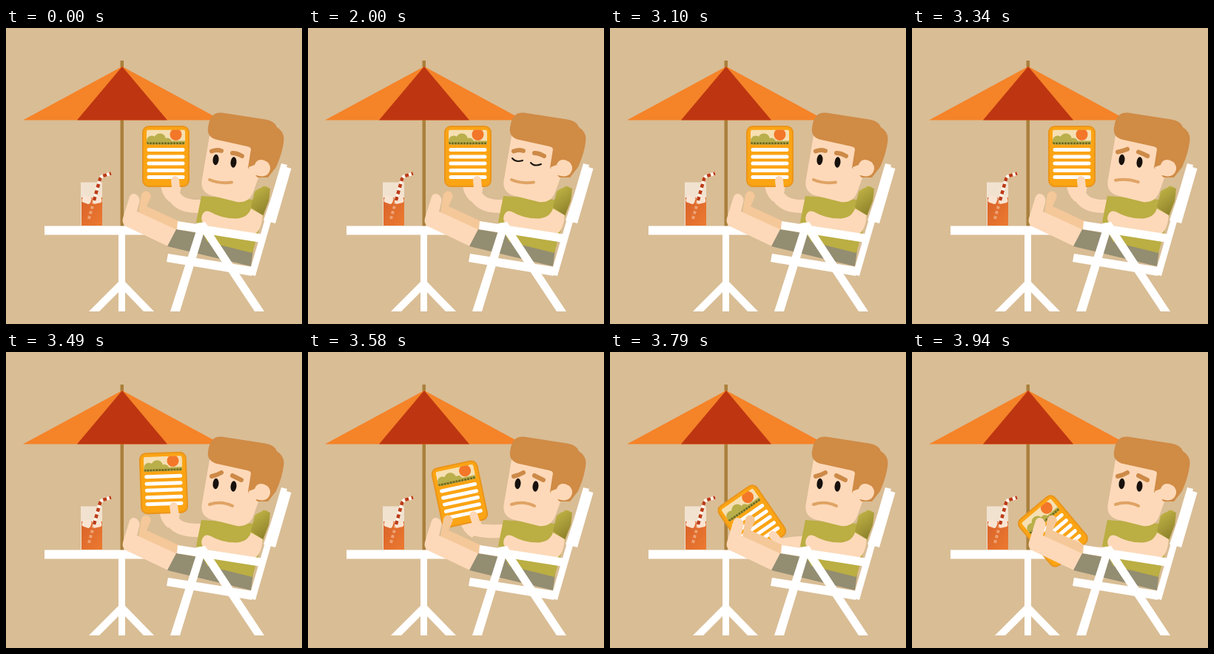
Animation of 400 by 400 pixels, one loop 4940 ms. Source, as an HTML page:

```html
<!DOCTYPE html>
<html lang="en">
<head>
<meta charset="utf-8">
<title>Deck chair</title>
<style>
  html, body { margin: 0; width: 100%; height: 100%; overflow: hidden; background: #d9bd95; }
  svg { display: block; width: 100%; height: 100%; }
  .skin { fill: #fdd9b9; }
  .white { fill: #fff; }
  .brow, .mouth { fill: none; stroke-linecap: round; }
  .brow { stroke: #cd8a48; stroke-width: 6; }
  .mouth { stroke: #dfa364; stroke-width: 4; }
  .lid { fill: none; stroke: #1a120c; stroke-width: 2; stroke-linecap: round; }
</style>
</head>
<body>
<svg viewBox="0 0 400 400">
  <defs>
    <linearGradient id="shade" x1="0" y1="0" x2="0.5" y2="1">
      <stop offset="0.2" stop-color="#bbae43"/>
      <stop offset="1" stop-color="#8f832c"/>
    </linearGradient>
    <linearGradient id="tea" x1="0" y1="0" x2="1" y2="1">
      <stop offset="0" stop-color="#d9622a"/>
      <stop offset="1" stop-color="#ec7a30"/>
    </linearGradient>
    <clipPath id="photo"><rect x="-26" y="-36" width="52" height="20" rx="3"/></clipPath>
  </defs>
  <rect width="400" height="400" fill="#d9bd95"/>

  <g id="parasol">
    <rect x="154.5" y="44" width="4.5" height="224" fill="#aa803c"/>
    <path d="M157 52L23 124.500H291Z" fill="#f58328"/>
    <path d="M157 52L96 124.500H218Z" fill="#bd3611"/>
  </g>

  <g id="table" class="white">
    <path d="M52 267.500H215V279.500H161V343L200 383H186L161 357V383H152V357L126 383H112L152 343V279.500H52Z"/>
  </g>

  <g id="drink" fill="none">
    <path d="M101 208.500H130V267H101Z" fill="#f1e2cf"/>
    <path d="M102 229H130V267H102Z" fill="url(#tea)"/>
    <path d="M112 258L119 233" stroke="#eda274" stroke-width="4" stroke-dasharray="4 3"/>
    <g fill="#f9e4d2">
      <rect x="103" y="227" width="12" height="10" rx="3" transform="rotate(18 109 232)"/>
      <rect x="117" y="227" width="12" height="10" rx="3" transform="rotate(-14 123 232)"/>
    </g>
    <g stroke-width="4.500">
      <path d="M119 233L127 204Q128 201 131 200L142 196.500" stroke="#fff4e8"/>
      <path d="M119 233L127 204Q128 201 131 200L142 196.500" stroke="#bb3b17" stroke-dasharray="5 4"/>
    </g>
  </g>

  <path id="arm" fill="none" stroke="#fdd9b9" stroke-width="18" stroke-linecap="round"/>
  <g id="tablet">
    <path class="skin" d="M-7 36Q-7 51 4 61L18 53 22 36Z"/>
    <rect x="-31" y="-40.500" width="62" height="81" rx="8" fill="#fba414" stroke="#ea951b" stroke-width="2"/>
    <g clip-path="url(#photo)">
      <rect x="-26" y="-36" width="52" height="20" fill="#f6dfb2"/>
      <g fill="#b9af4b">
        <circle cx="-19" cy="-21" r="7"/>
        <circle cx="-8" cy="-23" r="8"/>
        <circle cx="2" cy="-19" r="6"/>
        <rect x="-26" y="-21" width="52" height="5"/>
      </g>
      <circle cx="13.500" cy="-29.500" r="8" fill="#f37729"/>
      <path d="M-26 -17.500H26" stroke="#6f6a20" stroke-width="3" stroke-dasharray="3 1"/>
    </g>
    <path d="M-23 -9H23M-23 .5H23M-23 9.500H23M-23 19H23M-23 28H23" stroke="#fff" stroke-width="5" stroke-linecap="round"/>
    <path d="M12.500 32L14 47" stroke="#fdd9b9" stroke-width="11" stroke-linecap="round"/>
  </g>

  <g id="legs">
    <path d="M183 225Q187 218 193 222Q198 226 194 232L190 241L242 265 232 282 178 256Z" fill="#f5c899"/>
    <path class="skin" d="M167 228Q170 222 176 225Q182 229 180 236L177 248L236 275 221 296 162 268Q156 264 158 257Z"/>
    <path d="M230 272L275 280 334 300 331 322 218 295Z" fill="#938d72"/>
  </g>

  <g id="shirt">
    <path d="M264 227L335 232 347 214Q358 212 356 228L345 262 333 304 272 289 257 262Z" fill="#bbae43"/>
    <path d="M336 221Q346 212 357 217L355 234 347 254 331 242Z" fill="url(#shade)"/>
  </g>

  <g id="head">
    <path class="skin" d="M276 140L340 152 342 200 334 222Q328 237 312 235L278 226.500Q263 222 264.500 207Z"/>
    <path d="M283 150.500Q270 146 273.500 132Q276 113 292 114.500L350 123.500Q364 126 366 134Q376 140 375.500 151Q374 168 365 188L354 202H340L327 189 331 164Q331 161 326 160Z" fill="#d08b45"/>
    <path class="skin" d="M336 185Q339 176 348 178.500Q358 182 357 191Q354 204 338 199L330 203 328 188Z"/>
    <path id="browL" class="brow"/>
    <path id="browR" class="brow"/>
    <path id="mouth" class="mouth"/>
    <g id="open" fill="#17110d">
      <ellipse cx="283.500" cy="178" rx="4" ry="7.200" transform="rotate(5 283.500 178)"/>
      <ellipse cx="307.500" cy="181.500" rx="4" ry="7.200" transform="rotate(5 307.500 181.500)"/>
    </g>
    <g id="shut" class="lid">
      <path d="M276 176Q281 182 290 179"/>
      <path d="M301 182Q306 188 315 184"/>
    </g>
  </g>

  <path class="skin" d="M265 253Q268 245 276 248.500Q292 258 312 257.500Q327 256 331 244L347 253Q345 274 336 278L270 267Q262 261 265 253Z"/>

  <g id="chair" class="white">
    <path d="M372 183L380 185 337 335 328 333Z"/>
    <path d="M373 186L385.500 190 364 264 348 260Z"/>
    <path d="M219 305L334 323 332 335 217 316Z"/>
    <path d="M259 268L270 268 235 383H222Z"/>
    <path d="M257 264L269 262 349 383H336Z"/>
    <path d="M232 261L348 279 345 290 231 272Z"/>
  </g>
</svg>
<script>
const LOOP = 4940, BLINK = [2000, 2100];
const FROWN = [3100, 3450];
const STEP = 30;

// Lowering the tablet: time, x, y, angle, elbow x, elbow y
const drop = [
  [3400, 216, 173.5, 0, 262, 241],
  [3490, 213, 177, -2, 262, 241],
  [3580, 205, 192, -12, 262, 242],
  [3700, 194.5, 214.5, -28, 262, 247],
  [3940, 190.5, 242, -40, 268, 272]
];
// Points of each face line, calm and worried
const face = {
  browL: [[278, 166.5, 285, 164, 291, 166], [278, 168, 285, 166.5, 291, 163]],
  browR: [[306, 169, 312, 169, 319, 173], [306, 167, 311, 169.5, 318, 173]],
  mouth: [[275, 205, 289, 211, 305, 208.5], [275, 206, 291, 200.5, 306, 208]]
};

const $ = id => document.getElementById(id);
const clamp = v => Math.min(1, Math.max(0, v));
const ease = p => p * p * (3 - 2 * p);

function slope(i, c) {
  const a = drop[i - 1], b = drop[i + 1];
  return a && b ? (b[c] - a[c]) / (b[0] - a[0]) : 0;
}

// Smooth curve through the table, at rest at both ends
function track(t, c) {
  const last = drop.length - 1;
  if (t <= drop[0][0]) return drop[0][c];
  if (t >= drop[last][0]) return drop[last][c];
  const i = drop.findIndex(k => k[0] > t) - 1;
  const a = drop[i], b = drop[i + 1], d = b[0] - a[0], p = (t - a[0]) / d;
  const q = ease(p);
  return a[c] * (1 - q) + b[c] * q
    + d * p * (1 - p) * ((1 - p) * slope(i, c) - p * slope(i + 1, c));
}

function drawFace(t) {
  const p = ease(clamp((t - FROWN[0]) / (FROWN[1] - FROWN[0])));
  for (const id in face) {
    const [a, b] = face[id];
    const v = a.map((n, i) => n + (b[i] - n) * p);
    $(id).setAttribute("d", `M${v[0]} ${v[1]}Q${v.slice(2)}`);
  }
}

function drawTablet(t) {
  const [x, y, a, ex, ey] = [1, 2, 3, 4, 5].map(c => track(t, c));
  const r = a * Math.PI / 180, cos = Math.cos(r), sin = Math.sin(r);
  const hx = x + 9 * cos - 49 * sin, hy = y + 9 * sin + 49 * cos;
  $("tablet").setAttribute("transform", `translate(${x} ${y}) rotate(${a})`);
  $("arm").setAttribute("d", `M${hx} ${hy}Q${hx + 7} ${ey + 1} ${ex} ${ey}`);
}

function draw(now) {
  const t = now % LOOP;
  const shut = t >= BLINK[0] && t < BLINK[1];
  $("open").style.display = shut ? "none" : "";
  $("shut").style.display = shut ? "" : "none";
  const s = FROWN[0] + Math.floor((t - FROWN[0]) / STEP) * STEP;
  drawFace(s);
  drawTablet(s);
}

const start = performance.now();
function tick() {
  draw(performance.now() - start);
  requestAnimationFrame(tick);
}
tick();
</script>
</body>
</html>
```
